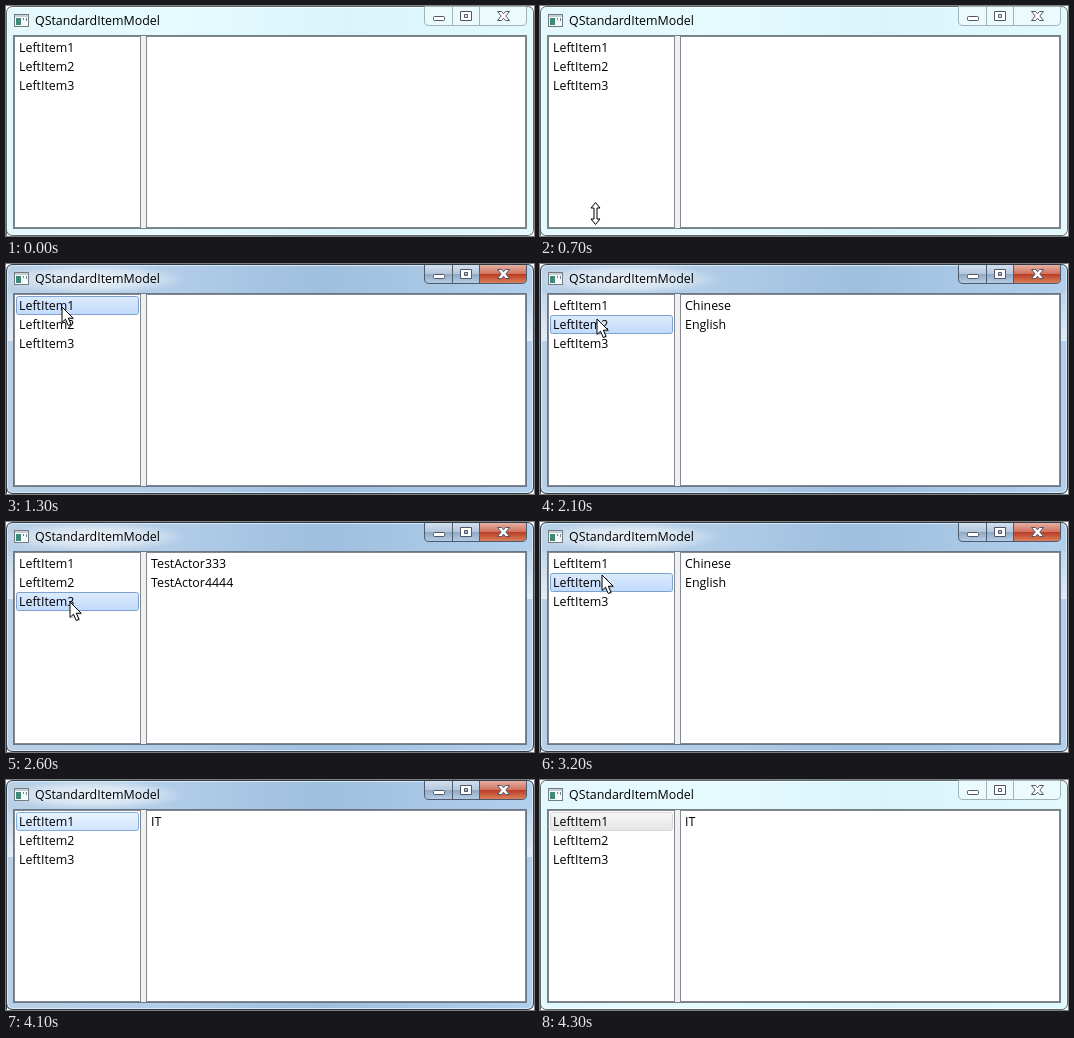
These frames come from a looping animation (528x230 px, 4400 ms). An HTML page:

```html
<!DOCTYPE html>
<html lang="en">
<head>
<meta charset="utf-8">
<title>QStandardItemModel</title>
<style>
  html, body { margin: 0; width: 100%; height: 100%; overflow: hidden; background: #fff; }
  svg { display: block; width: 528px; height: 230px; }
  text { font: 12.4px "Open Sans", "Noto Sans", sans-serif; fill: #000; white-space: pre; }
</style>
</head>
<body>
<svg id="stage" viewBox="0 0 528 230" xmlns="http://www.w3.org/2000/svg">
  <defs id="defs">
    <linearGradient id="glassIdle">
      <stop offset="0" stop-color="#e3f8fc"/>
      <stop offset=".3" stop-color="#e6fbfe"/>
      <stop offset=".65" stop-color="#d9f5fb"/>
      <stop offset="1" stop-color="#e2f9fd"/>
    </linearGradient>
    <linearGradient id="glassLive">
      <stop offset="0" stop-color="#b9d0e6"/>
      <stop offset=".3" stop-color="#b2cde8"/>
      <stop offset=".6" stop-color="#9fbfde"/>
      <stop offset="1" stop-color="#b2cfec"/>
    </linearGradient>
    <radialGradient id="glow">
      <stop offset="0" stop-color="#fff" stop-opacity=".75"/>
      <stop offset=".6" stop-color="#fff" stop-opacity=".45"/>
      <stop offset="1" stop-color="#fff" stop-opacity="0"/>
    </radialGradient>
    <linearGradient id="side" x2="0" y2="1">
      <stop offset="0" stop-color="#fff" stop-opacity=".15"/>
      <stop offset="1" stop-color="#fff" stop-opacity=".6"/>
    </linearGradient>
    <linearGradient id="steel" x2="0" y2="1">
      <stop offset="0" stop-color="#d3e0ee"/>
      <stop offset=".48" stop-color="#b4c7dc"/>
      <stop offset=".5" stop-color="#8fa8c3"/>
      <stop offset="1" stop-color="#b3cbe4"/>
    </linearGradient>
    <linearGradient id="red" x2="0" y2="1">
      <stop offset="0" stop-color="#e6b0a3"/>
      <stop offset=".48" stop-color="#d0735f"/>
      <stop offset=".5" stop-color="#b93a22"/>
      <stop offset="1" stop-color="#d9805c"/>
    </linearGradient>
    <path id="frame" d="M.5 229.5V7Q.5 .5 7 .5H521Q527.5 .5 527.5 7V223Q527.5 229.5 521 229.5H7Q.5 229.5 .5 223Z"/>
    <path id="buttons" d="M418.5 .5V15Q418.5 19.5 423 19.5H516Q520.5 19.5 520.5 15V.5M446.5 1V19M473.5 1V19"/>
    <g id="glyphs" stroke="#535666" fill="#fff">
      <rect x="427.5" y="10.5" width="11" height="4" rx="1"/>
      <path fill-rule="evenodd" d="M454.5 5.5H465.5V14.500H454.500ZM458.500 8.500V11.500H461.500V8.500Z"/>
      <path d="M491.500 5.500H495.500L497.500 7.800L499.500 5.500H503.500L499.800 10L503.500 14.500H499.500L497.500 12.200L495.500 14.500H491.500L495.200 10Z"/>
    </g>
  </defs>

  <g id="idle">
    <use href="#frame" fill="url(#glassIdle)" stroke="#59686d"/>
    <path d="M1.500 222V8Q1.500 1.500 8 1.500H520Q526.500 1.500 526.500 8V222Q526.500 228.500 520 228.500H8Q1.500 228.500 1.500 222Z" fill="none" stroke="#f4fdff"/>
    <use href="#buttons" fill="#ebfafd" stroke="#a3b2b9"/>
  </g>
  <g id="live">
    <use href="#frame" fill="url(#glassLive)"/>
    <path d="M1 29H7V77H1ZM521 29H527V77H521Z" fill="url(#side)"/>
    <ellipse cx="88" cy="15" rx="92" ry="15" fill="url(#glow)"/>
    <path d="M1.500 222V8Q1.500 1.500 8 1.500H520Q526.500 1.500 526.500 8V222Q526.500 228.500 520 228.500H8Q1.500 228.500 1.500 222Z" fill="none" stroke="#e3eff9" stroke-opacity=".85"/>
    <use href="#frame" fill="none" stroke="#2f3b47"/>
    <path d="M419 1H473V19H423Q419 19 419 15Z" fill="url(#steel)"/>
    <path d="M474 1H520V15Q520 19 516 19H474Z" fill="url(#red)"/>
    <use href="#buttons" fill="none" stroke="#4d5b6c"/>
  </g>

  <use href="#glyphs"/>
  <g id="icon">
    <rect x="8.500" y="8.500" width="14" height="12" fill="#f8fafa" stroke="#737b80"/>
    <path d="M9 9H22V11H9Z" fill="#c7d0d6"/>
    <path d="M10 12H15V19H10Z" fill="#3d8a78"/>
    <path d="M17 12H18V14H17ZM20 12H21V15H20Z" fill="#6e8596"/>
  </g>
  <text x="29" y="19">QStandardItemModel</text>

  <rect x="7" y="29" width="514" height="194" fill="#f0f0f0"/>
  <rect x="8.500" y="30.500" width="126" height="191" fill="#fff" stroke="#828790"/>
  <rect x="140.500" y="30.500" width="379" height="191" fill="#fff" stroke="#828790"/>
  <rect id="client" x="7.500" y="29.500" width="513" height="193" fill="none"/>

  <g id="rows"></g>
  <text id="top" x="145" y="46"></text>
  <text id="bottom" x="145" y="65"></text>

  <g id="cursor" fill="#fff" stroke="#000" stroke-linejoin="round">
    <g data-kind="arrow">
      <path d="M1.500 2V17L5 13.700L7.500 19.500L10.500 18.300L8 12.500H13Z" fill="#000" stroke="none" opacity=".18"/>
      <path d="M0 0V15.500L3.500 12.200L6.200 18.500L9 17.300L6.300 11.200H11.200Z"/>
    </g>
    <path data-kind="resize" d="M0 -11L4.500 -5.500H1.500V5.500H4.500L0 11L-4.500 5.500H-1.500V-5.500H-4.500Z"/>
    <path data-kind="split" d="M-2.500 -9H-.5V9H-2.500ZM.5 -9H2.500V9H.5ZM-11 0L-6.500 -4V-1H-3V1H-6.500V4ZM11 0L6.500 -4V-1H3V1H6.500V4Z"/>
  </g>
</svg>
<script>
const LOOP = 4400, STEP = 100, ROW_TOP = 32, ROW_HEIGHT = 19;
const byId = id => document.getElementById(id);

// Each list holds [start time, value...]; a value stays until the next entry.
const pointer = [
  [0], [100, "split", 139, 195], [200, "arrow", 104, 124], [300, "arrow", 72, 80], [400],
  [700, "resize", 55.5, 207.5], [800, "arrow", 55, 165], [900, "arrow", 55, 118],
  [1000, "arrow", 55, 82], [1100, "arrow", 56, 58], [1200, "arrow", 56, 46],
  [1300, "arrow", 56, 43], [1900, "arrow", 57, 55], [2200, "arrow", 59, 63],
  [2300, "arrow", 62, 72], [2400, "arrow", 63, 77], [2500, "arrow", 64, 80],
  [2700, "arrow", 64, 75], [2800, "arrow", 64, 66], [2900, "arrow", 63, 61],
  [3200, "arrow", 62, 53], [3300, "arrow", 61, 47], [3400, "arrow", 60, 43],
  [3700, "arrow", 58, 54], [3800, "arrow", 57, 76], [3900, "arrow", 56, 124],
  [4000, "arrow", 55, 190], [4100]
];
const selection = [[0, -1], [1300, 0], [1900, 1], [2400, 2], [2900, 1], [3400, 0]];
const details = [
  [0, "", ""], [1500, "IT", ""], [2100, "Chinese", "English"],
  [2600, "TestActor333", "TestActor4444"], [3100, "Chinese", "English"], [3600, "IT", ""]
];
const styles = {
  hot: ["#b8d6fb", "#fafbfd", "#ebf3fd"],
  selected: ["#84acdd", "#ebf4fe", "#cfe4fe"],
  pressed: ["#7da2ce", "#dcebfc", "#c1dbfc"],
  unfocused: ["#d9d9d9", "#f8f8f8", "#e5e5e5"]
};

for (const [name, [, from, to]] of Object.entries(styles)) {
  byId("defs").insertAdjacentHTML("beforeend",
    `<linearGradient id="${name}" x2="0" y2="1"><stop stop-color="${from}"/>` +
    `<stop offset="1" stop-color="${to}"/></linearGradient>`);
}
for (let i = 0; i < 3; i++) {
  const y = ROW_TOP + i * ROW_HEIGHT;
  byId("rows").insertAdjacentHTML("beforeend",
    `<rect x="10.5" y="${y + .5}" width="122" height="18" rx="2"/>` +
    `<text x="13" y="${y + 14}">LeftItem${i + 1}</text>`);
}
const boxes = [...document.querySelectorAll("#rows rect")];
const shapes = [...byId("cursor").children];

const at = (list, t) => list.findLast(([start]) => start <= t).slice(1);
const show = (node, on) => node.setAttribute("visibility", on ? "visible" : "hidden");

function rowStyle(selected, hovered, active) {
  if (!selected) return hovered ? "hot" : null;
  if (!active) return "unfocused";
  return hovered ? "pressed" : "selected";
}

function draw(time) {
  const t = Math.floor(time % LOOP / STEP) * STEP;
  const active = t >= 1300 && t < 4300;
  const [kind, x = 0, y = 0] = at(pointer, t);
  const [chosen] = at(selection, t);
  const [first, second] = at(details, t);
  const hoveredRow = kind === "arrow" && x < 133 ? Math.floor((y - ROW_TOP) / ROW_HEIGHT) : -1;

  show(byId("live"), active);
  show(byId("idle"), !active);
  byId("client").setAttribute("stroke", active ? "#66788a" : "#737f84");
  boxes.forEach((box, i) => {
    const name = rowStyle(i === chosen, i === hoveredRow, active);
    show(box, name);
    if (!name) return;
    box.setAttribute("fill", `url(#${name})`);
    box.setAttribute("stroke", styles[name][0]);
  });
  byId("top").textContent = first;
  byId("bottom").textContent = second;
  shapes.forEach(shape => show(shape, shape.dataset.kind === kind));
  byId("cursor").setAttribute("transform", `translate(${x} ${y})`);
}

const begin = performance.now();
function tick() {
  draw(performance.now() - begin);
  requestAnimationFrame(tick);
}
tick();
</script>
</body>
</html>
```
